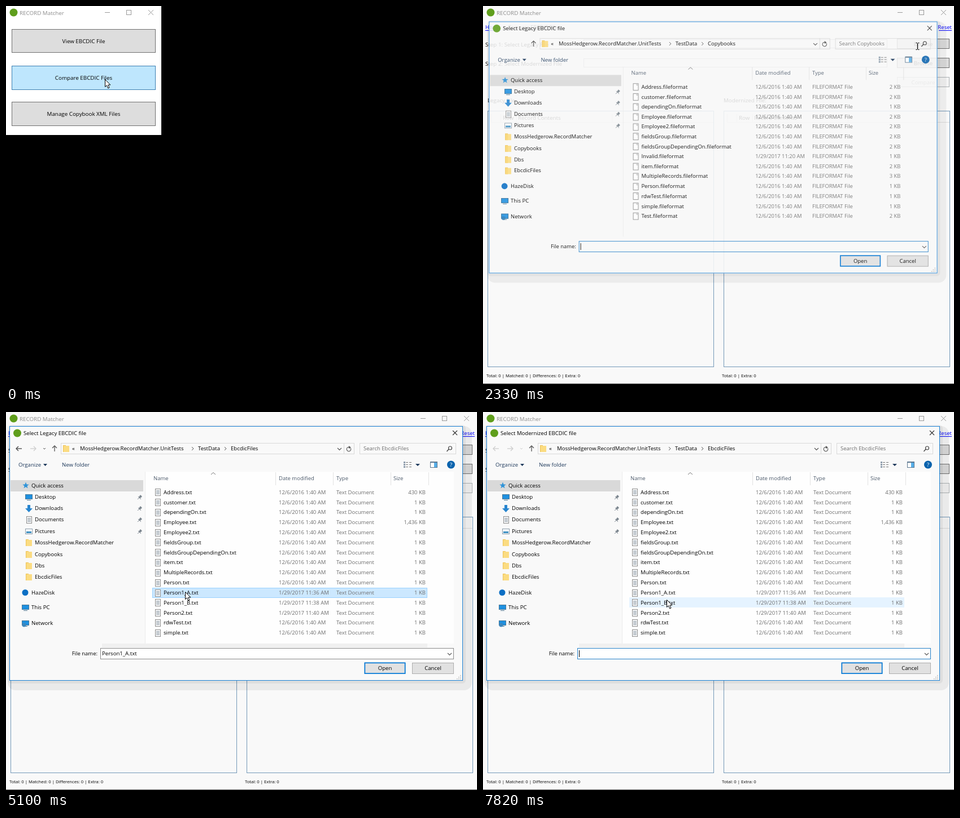
An HTML page with a canvas for the animation above (8000 ms loop, 834x671 px).

```html
<!DOCTYPE html>
<html lang="en">
<head>
<meta charset="utf-8">
<title>File comparison</title>
<style>
  html, body { margin: 0; width: 100%; height: 100%; overflow: hidden; background: #000; }
  canvas { display: block; }
</style>
</head>
<body>
<canvas id="stage" width="834" height="671"></canvas>
<script>
const ctx = document.getElementById('stage').getContext('2d');
const LOOP = 8000;
const APP = 'RECORD Matcher';
const PROJECT = 'MossHedgerow.RecordMatcher';
const GREEN = '#5f9e1c', BLUE = '#0078d7', INK = '#000', GREY = '#6d6d6d', FOLDER = '#fbdc82';

// start, end, steps, target x, target y, optional control point
const MOVES = [
  [830, 1790, 8, 769, 70, 400, 245],
  [2750, 3310, 5, 78, 290],
  [3580, 3720, 2, 190, 265],
  [3870, 4410, 5, 308, 178],
  [4550, 4830, 3, 317, 319],
  [5760, 6390, 6, 770, 98],
  [6660, 6790, 2, 733, 115],
  [6930, 7170, 3, 520, 250],
  [7290, 7820, 5, 325, 333],
];
// time, opacity, scale
const DIALOG = [
  [0, 0, 1], [2210, .4, .96], [2330, .87, .989], [2480, 1, 1],
  [5640, .87, .989], [5760, .3, .96], [5880, 0, 1],
  [6660, .4, .96], [6790, .88, .992], [6930, 1, 1],
];

const file = (name, size = '1 KB', date = '12/6/2016 1:40 AM') => ({ name, size, date });
const COPYBOOKS = [
  file('Address', '2 KB'), file('customer', '2 KB'), file('dependingOn'),
  file('Employee', '2 KB'), file('Employee2', '2 KB'), file('fieldsGroup', '2 KB'),
  file('fieldsGroupDependingOn', '2 KB'), file('Invalid', '1 KB', '1/29/2017 11:20 AM'),
  file('item', '2 KB'), file('MultipleRecords', '3 KB'), file('Person'),
  file('rdwTest'), file('simple'), file('Test', '2 KB'),
];
const DATA_FILES = [
  file('Address', '430 KB'), file('customer'), file('dependingOn'), file('Employee', '1,436 KB'),
  file('Employee2'), file('fieldsGroup'), file('fieldsGroupDependingOn'), file('item'),
  file('MultipleRecords'), file('Person'), file('Person1_A', '1 KB', '1/29/2017 11:36 AM'),
  file('Person1_B', '1 KB', '1/29/2017 11:38 AM'), file('Person2', '1 KB', '1/29/2017 11:40 AM'),
  file('rdwTest'), file('simple'),
];

const between = (t, a, b) => t >= a && t < b;
const inside = (p, x, y, w, h) => between(p.x, x, x + w) && between(p.y, y, y + h);

function text(str, x, y, { size = 9.8, color = INK, align = 'left' } = {}) {
  ctx.font = `${size}px "Open Sans", "Noto Sans", sans-serif`;
  ctx.textAlign = align;
  ctx.fillStyle = color;
  ctx.fillText(str, x, Math.round(y + size * .36));
}
function rect(x, y, w, h, fill, border, weight = 1) {
  if (fill) { ctx.fillStyle = fill; ctx.fillRect(x, y, w, h); }
  if (border) {
    ctx.strokeStyle = border;
    ctx.lineWidth = weight;
    ctx.strokeRect(x + weight / 2, y + weight / 2, w - weight, h - weight);
  }
}
function line(color, weight, ...pts) {
  ctx.strokeStyle = color;
  ctx.lineWidth = weight;
  ctx.beginPath();
  for (let i = 0; i < pts.length; i += 2) ctx.lineTo(pts[i], pts[i + 1]);
  ctx.stroke();
}
function shape(fill, ...pts) {
  ctx.fillStyle = fill;
  ctx.beginPath();
  for (let i = 0; i < pts.length; i += 2) ctx.lineTo(pts[i], pts[i + 1]);
  ctx.closePath();
  ctx.fill();
}
function disc(x, y, r, fill) {
  ctx.fillStyle = fill;
  ctx.beginPath();
  ctx.arc(x, y, r, 0, 7);
  ctx.fill();
}
function scaled(alpha, scale, cx, cy, draw) {
  ctx.save();
  ctx.globalAlpha = alpha;
  ctx.translate(cx, cy);
  ctx.scale(scale, scale);
  ctx.translate(-cx, -cy);
  draw();
  ctx.restore();
}

function cursorAt(t) {
  let x = 175, y = 130;
  for (const [start, end, steps, tx, ty, cx = (x + tx) / 2, cy = (y + ty) / 2] of MOVES) {
    if (t < start) break;
    const step = Math.floor((t - start) / (end - start) * (steps - 1) + 1e-6) + 1;
    const u = Math.min(1, step / steps), e = (1 - Math.cos(Math.PI * u)) / 2;
    const bend = (a, c, b) => (1 - e) ** 2 * a + 2 * e * (1 - e) * c + e * e * b;
    x = bend(x, cx, tx);
    y = bend(y, cy, ty);
  }
  return { x: Math.round(x), y: Math.round(y) };
}
function drawCursor({ x, y }, beam) {
  ctx.save();
  ctx.translate(x + .5, y + .5);
  if (beam) {
    line('#000', 1, -3, -5, -1, -5, 0, -4, 1, -5, 3, -5);
    line('#000', 1.3, 0, -4, 0, 6);
    line('#000', 1, -3, 7, -1, 7, 0, 6, 1, 7, 3, 7);
  } else {
    const arrow = [0, 0, 0, 13, 3, 10.3, 5.2, 15.5, 7.5, 14.5, 5.3, 9.5, 9.4, 9.5, 0, 0];
    shape('#fff', ...arrow);
    line('#000', 1, ...arrow);
  }
  ctx.restore();
}

function titleBar(width, active) {
  const ink = active ? '#000' : '#999';
  disc(13.5, 11.5, 7, GREEN);
  text(APP, 24, 12, { color: active ? '#000' : '#8c8c8c' });
  line(ink, 1, width - 100, 11.5, width - 91, 11.5);
  rect(width - 62, 7, 9, 9, null, ink);
  line(ink, 1, width - 23, 7, width - 14, 16);
  line(ink, 1, width - 14, 7, width - 23, 16);
}
function button(label, x, y, w, h, { hover, disabled } = {}) {
  rect(x, y, w, h, disabled ? '#f4f4f4' : hover ? '#bee6fd' : '#ddd',
    disabled ? '#adb2b5' : hover ? '#3c7fb1' : '#707070');
  text(label, x + w / 2, y + h / 2, { align: 'center', color: disabled ? '#838383' : INK });
}

function drawMenu() {
  rect(0, 0, 275, 229, '#fff');
  titleBar(275, false);
  button('View EBCDIC File', 10, 41, 255, 42);
  button('Compare EBCDIC Files', 10, 106, 255, 43, { hover: true });
  button('Manage Copybook XML Files', 10, 170, 255, 43);
}

function drawPanel(x, label) {
  text(label, x, 167);
  rect(x, 186, 401, 455, null, '#7398b8');
  for (const dx of [6, 23, 51, 220]) rect(x + dx, 192, 1, 15, '#dcdcdc');
  rect(x + 6, 206, 394, 1, '#dcdcdc');
  text('Row', x + 27, 198);
  text('Record Contents', x + 54, 198);
}

function drawMain(t, cursor, dialogOpen) {
  const active = t < 2080 || between(t, 5640, 6660);
  rect(0, 0, 834, 671, t < 2080 ? '#f5f5f5' : '#f9f9f9');
  if (active && t > 2080) rect(0, 0, 834, 24, '#fff');
  titleBar(834, active);
  text('Home', 4, 38, { size: 9.5, color: '#00f' });
  rect(4, 43, 27, 1, '#00f');
  text('>', 36, 38, { size: 8.9 });
  text('Compare EBCDIC Files', 44, 38, { size: 8.9 });
  text('Reset', 830, 38, { size: 9.6, color: '#00f', align: 'right' });
  rect(807, 43, 23, 1, '#00f');

  text('Step 1: Select Legacy File', 4, 68);
  text('Step 2: Select Modernized File', 4, 102);
  for (const y of [59, 93]) {
    rect(178, y, 538, 16, null, '#abadb3');
    button('Browse', 733, y - 1, 93, 18, { hover: !dialogOpen && inside(cursor, 733, y - 1, 93, 18) });
  }
  button('Compare', 733, 126, 93, 18, { disabled: true });
  if (t >= 5880) {
    ctx.save();
    ctx.beginPath();
    ctx.rect(179, 60, 535, 14);
    ctx.clip();
    text(`C:\\Workspace\\Development\\Projects\\Archive\\Source\\${PROJECT}\\${PROJECT}.UnitTests\\TestData\\EbcdicFiles\\Person1_A.txt`, 181, 68);
    ctx.restore();
  }
  drawPanel(8, 'Legacy File:');
  drawPanel(426, 'Modernized File:');
  text('Total: 0 | Matched: 0 | Differences: 0 | Extra: 0', 6, 656, { size: 7.7 });
  text('Total: 0 | Extra: 0', 423, 656, { size: 7.7 });
  rect(0, 670, 834, 1, active ? '#1883d7' : '#666');
}

const folderIcon = (x, y) => {
  rect(x, y - 6, 5, 12, '#eec254');
  rect(x + 1, y - 5, 10, 11, FOLDER);
};
const fileIcon = (x, y, lined) => {
  rect(x, y - 6, 10, 13, '#fff', '#8a8a8a');
  if (lined) for (let i = 0; i < 4; i++) rect(x + 2, y - 3 + i * 2, 6, 1, '#8d9aa5');
  else shape('#c4c4c4', x + 6, y - 6, x + 10, y - 2, x + 6, y - 2);
};
const screenIcon = (x, y) => {
  rect(x, y - 5, 13, 9, '#1e90e0', '#4c7896');
  rect(x + 3, y + 5, 7, 1, '#4c7896');
};
function starIcon(x, y) {
  const pts = [];
  for (let i = 0; i < 10; i++) {
    const r = i % 2 ? 2.5 : 6, a = i * Math.PI / 5 - Math.PI / 2;
    pts.push(x + r * Math.cos(a), y + r * Math.sin(a));
  }
  shape('#2f93d8', ...pts);
}

// label, y, indented, icon
const PLACES = [
  ['Quick access', 130.5, false, y => starIcon(35, y)],
  ['Desktop', 151, true, y => screenIcon(34, y)],
  ['Downloads', 171, true, y => shape('#2785cf', 38, y - 6, 43, y - 6, 43, y, 47, y, 40.5, y + 7, 34, y, 38, y)],
  ['Documents', 191, true, y => fileIcon(36, y, true)],
  ['Pictures', 212, true, y => { rect(34, y - 5, 13, 10, '#fff', '#8a9aa8'); rect(36, y, 9, 3, '#3a8dc0'); }],
  [PROJECT, 232, true, y => folderIcon(35, y)],
  ['Copybooks', 253, true, y => folderIcon(35, y)],
  ['Dbs', 273, true, y => folderIcon(35, y)],
  ['EbcdicFiles', 293, true, y => folderIcon(35, y)],
  ['HazeDisk', 320.5, false, y => disc(34, y, 5.5, '#0c6fc4')],
  ['This PC', 347, false, y => screenIcon(28, y)],
  ['Network', 375, false, y => { screenIcon(28, y); disc(32, y + 3, 3.5, '#3d87bd'); }],
];

function drawPlaces(cursor, settled) {
  rect(8, 121, 235, 20, '#d9d9d9');
  PLACES.forEach(([label, y, indented, icon], i) => {
    if (settled && i && inside(cursor, 18, y - 10, 225, 20)) rect(18, y - 10, 225, 20, '#e5f3ff');
    icon(y);
    text(label, indented ? 51 : 45, y, { size: 9.6 });
    if (between(i, 1, 5)) {
      line('#7d8790', 1, 233, y + 4, 236, y + 1);
      line('#7d8790', 1, 234, y - 1, 239, y + 4);
      shape('#7d8790', 235, y, 238, y - 4, 241, y - 1, 238, y + 2);
    }
  });
}

function drawFiles(files, ext, type, selected, cursor, settled) {
  const head = { size: 9.5, color: '#4c5a6b' };
  text('Name', 261, 118, head);
  text('Date modified', 483, 118, head);
  text('Type', 585, 118, head);
  text('Size', 686, 118, head);
  for (const x of [477, 579, 681, 748]) rect(x, 107, 1, 23, '#e3e3e3');
  line('#777', 1, 363, 111, 367, 107.5, 371, 111);
  files.forEach(({ name, size, date }, i) => {
    const y = 142.3 + i * 17.82, top = Math.round(y - 9);
    if (i === selected) rect(259, top, 487, 18, '#cce8ff', '#99d1ff');
    else if (settled && inside(cursor, 259, top, 487, 18)) rect(259, top, 487, 18, '#e5f3ff');
    fileIcon(264, Math.round(y), ext === '.txt');
    text(name + ext, 279, y, { size: 9.6 });
    const detail = { size: 9.5, color: GREY };
    text(date, 483, y, detail);
    text(type, 585, y, detail);
    text(size, 743, y, { ...detail, align: 'right' });
  });
}

function drawToolbar(t, folder, settled, navigated) {
  if (settled) {
    const arrow = (x, dir, color) => {
      line(color, 1.3, x - 5, 65, x + 5, 65);
      line(color, 1.3, x + dir, 61, x + dir * 5, 65, x + dir, 69);
    };
    arrow(23, -1, navigated ? '#444' : '#ccc');
    arrow(48, 1, '#ccc');
    line(navigated ? '#555' : '#ccc', 1, 66, 64, 68, 66, 70, 64);
  }
  line('#555', 1.3, 86, 70, 86, 60);
  line('#555', 1.3, 82, 64, 86, 60, 90, 64);
  rect(97, 55, 520, 20, null, '#d9d9d9');
  rect(598, 55, 1, 20, '#d9d9d9');
  rect(626, 55, 171, 20, null, '#d9d9d9');
  folderIcon(101, 65);
  const crumb = { size: 9.6 };
  text('«', 117, 64.5, crumb);
  text(PROJECT + '.UnitTests', 131, 64.5, crumb);
  text('TestData', 340, 64.5, crumb);
  text(folder, 398, 64.5, crumb);
  for (const x of [329, 387]) line('#555', 1, x, 62, x + 3, 65, x, 68);
  line('#555', 1.2, 587, 64, 590.5, 67.5, 594, 64);
  ctx.strokeStyle = '#555';
  ctx.beginPath();
  ctx.arc(607, 66, 3.7, -.5, 5);
  ctx.stroke();
  shape('#555', 607, 60, 611, 63, 607, 65);
  text('Search ' + folder, 633, 65, { size: 9.5, color: GREY });
  ctx.strokeStyle = '#444';
  ctx.beginPath();
  ctx.arc(786.5, 64, 3, 0, 7);
  ctx.stroke();
  line('#444', 1.3, 784, 66, 780.5, 70);

  text('Organize', 22, 93.5, { size: 9.6, color: '#1e395b' });
  text('New folder', 99, 93.5, { size: 9.6, color: '#1e395b' });
  shape('#1e395b', 66, 92, 73, 92, 69.5, 96);
  for (let i = 0; i < 3; i++) {
    rect(704, 88 + i * 4, 3, 3, '#8c9bab');
    rect(708, 89 + i * 4, 4, 1, '#777');
    rect(714, 89 + i * 4, 4, 1, '#777');
  }
  shape('#1e395b', 725, 92, 733, 92, 729, 96);
  if (between(t, 6660, 6930)) rect(746, 83, 23, 21, '#d8ebf9', '#7eb8e5');
  rect(751, 88, 13, 11, '#fff', '#5d7890');
  rect(752, 88, 11, 2, '#5d7890');
  rect(758, 90, 5, 8, '#55aee8');
  disc(788, 93.5, 7, '#0b63ad');
  text('?', 788, 93.5, { color: '#fff', align: 'center' });
}

function drawDialog(t, cursor, settled) {
  const second = t >= 6660, closing = between(t, 5640, 5880);
  const navigated = between(t, 3580, 6660), copybooks = t < 3580;
  const picked = between(t, 4830, 6660);

  rect(6, 25, 803, 452, '#f9f9f9', '#1a80d4');
  if (settled) {
    rect(247, 106, 546, 305, '#fefefe');
    if (t >= 7290 || between(t, 3870, 6000)) rect(170, 411, 576, 7, '#f0f0f0');
  }
  if (!closing) disc(20, 37.5, 7, GREEN);
  text(`Select ${second ? 'Modernized' : 'Legacy'} EBCDIC file`, closing ? 14 : 31, 38, { size: 9.6 });
  line('#333', 1.1, 791, 33, 799, 41);
  line('#333', 1.1, 799, 33, 791, 41);

  drawToolbar(t, copybooks ? 'Copybooks' : 'EbcdicFiles', settled, navigated);
  drawPlaces(cursor, settled);
  rect(246, 106, 1, 305, '#ececec');
  if (copybooks) drawFiles(COPYBOOKS, '.fileformat', 'FILEFORMAT File', -1, cursor, settled);
  else drawFiles(DATA_FILES, '.txt', 'Text Document', picked ? 10 : -1, cursor, settled);

  text('File name:', 162, 429, { size: 9.5, align: 'right' });
  rect(167, 419, 626, 20, settled ? '#fff' : null, picked ? '#8a8a8a' : navigated ? '#3a6e9b' : '#2480c8');
  line('#555', 1.1, 782, 428, 785.5, 431.5, 789, 428);
  if (picked) text('Person1_A.txt', 170, 429, { size: 9.6 });
  const blink = t - (second ? 6700 : 2250);
  if (!navigated && Math.floor(blink / 530) % 2 === 0) rect(170, 423, 1, 12, '#000');

  rect(634.5, 444.5, 73, 20.5, '#e1e1e1', BLUE, 1.7);
  rect(719, 445, 74, 20, '#e1e1e1', '#adadad');
  text('Open', 671, 454.5, { size: 9.6, align: 'center' });
  text('Cancel', 756, 454.5, { size: 9.6, align: 'center' });
  for (let i = 0; i < 3; i++)
    for (let j = 0; j <= i; j++) rect(804 - j * 3, 467 + i * 3, 1.5, 1.5, '#b5b5b5');
}

// Two flat layers that stay outside the dialog itself.
function drawShadow() {
  const layer = (opacity, x, y, w, h, radius) => {
    ctx.fillStyle = `rgba(0,0,0,${opacity})`;
    ctx.beginPath();
    ctx.roundRect(x, y, w, h, radius);
    ctx.rect(6, 25, 803, 452);
    ctx.fill('evenodd');
  };
  layer(.06, 3, 25, 822, 469, 14);
  layer(.05, 3, 23, 811, 459, 6);
}

function render(t) {
  const cursor = cursorAt(t);
  const [, alpha, scale] = DIALOG.findLast(([start]) => t >= start);
  rect(0, 0, 834, 671, '#000');
  if (t < 270) drawMenu();
  else if (t < 400) scaled(.5, .96, 417, 335, () => drawMain(t, cursor, false));
  else drawMain(t, cursor, alpha > 0);
  if (alpha) {
    scaled(alpha, scale, 407, 250, () => {
      drawShadow();
      drawDialog(t, cursor, alpha === 1);
    });
  }
  drawCursor(cursor, alpha > .5 && inside(cursor, 626, 55, 171, 20));
}

const began = performance.now();
function tick() {
  render((performance.now() - began) % LOOP);
  requestAnimationFrame(tick);
}
tick();
</script>
</body>
</html>
```
